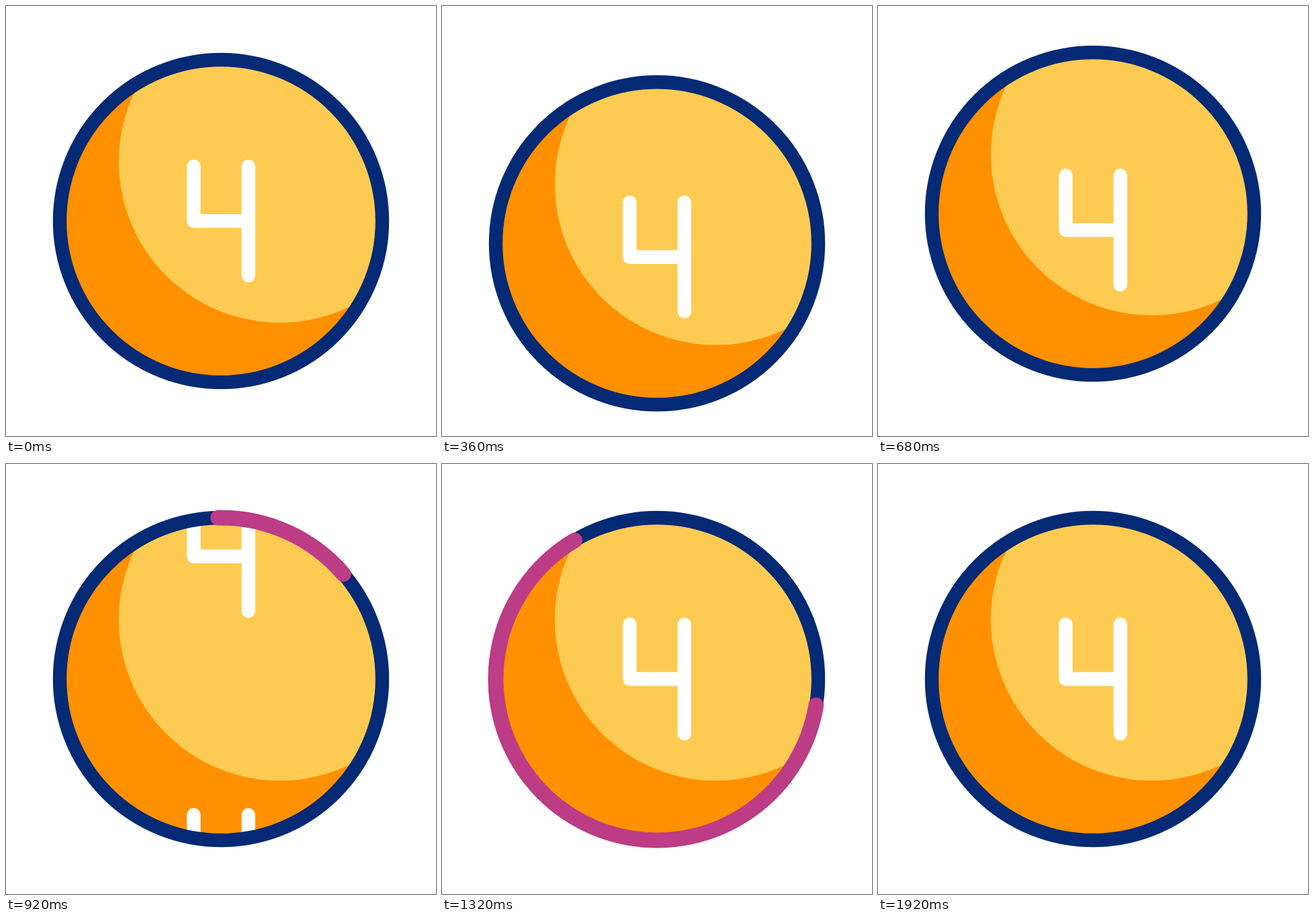
An HTML page with a canvas for the animation above (2 s loop, 640 by 640 pixels).

```html
<!DOCTYPE html>
<html lang="en">
<head>
<meta charset="utf-8">
<title>Bouncing ball</title>
<style>
  html, body { margin: 0; width: 100%; height: 100%; overflow: hidden; background: #fff; }
  canvas { display: block; width: 640px; height: 640px; }
</style>
</head>
<body>
<canvas id="stage" width="640" height="640"></canvas>
<script>
const ctx = document.getElementById('stage').getContext('2d');
const LOOP = 2000, STEP = 40, TAU = Math.PI * 2;
const C = 320, R = 240, LINE = 20.4;
const WRAP = 466; // distance between the two copies of the digit

// Keyframes: [time in ms, value]
const ballY = [[120, 0], [360, 33.3], [560, -30.9], [760, 0]];
const digitY = [[120, 0], [360, 53.7], [560, -61], [760, 54], [1120, -513], [1320, -WRAP]];
const arcHead = [[760, 0], [1440, 1]];
const arcTail = [[1000, 0], [1920, 1]];

// Eased value of a track at time t
function at(track, t) {
  if (t <= track[0][0]) return track[0][1];
  for (let i = 1; i < track.length; i++) {
    const [t0, a] = track[i - 1], [t1, b] = track[i];
    if (t < t1) {
      const s = (t - t0) / (t1 - t0);
      return a + (b - a) * s * s * (3 - 2 * s);
    }
  }
  return track[track.length - 1][1];
}

function disc(x, y, r, color) {
  ctx.fillStyle = color;
  ctx.beginPath();
  ctx.arc(x, y, r, 0, TAU);
  ctx.fill();
}

function stroke(color, width) {
  ctx.strokeStyle = color;
  ctx.lineWidth = width;
  ctx.stroke();
}

function digit(dy) {
  ctx.beginPath();
  ctx.moveTo(279.4, 238.6 + dy);
  ctx.lineTo(279.4, 320 + dy);
  ctx.lineTo(360.8, 320 + dy);
  ctx.moveTo(360.8, 238.6 + dy);
  ctx.lineTo(360.8, 401.2 + dy);
  stroke('#fff', LINE);
}

function draw(t) {
  const y = at(ballY, t), dy = at(digitY, t);
  ctx.fillStyle = '#fff';
  ctx.fillRect(0, 0, 640, 640);
  ctx.lineCap = ctx.lineJoin = 'round';

  ctx.save();
  ctx.beginPath();
  ctx.arc(C, C + y, R, 0, TAU);
  ctx.clip();
  disc(C, C + y, R + 2, '#ff9000');
  disc(407.6, 231.6 + y, 239.7, '#fdcb52');
  digit(dy);
  digit(dy + WRAP);
  ctx.restore();

  ctx.beginPath();
  ctx.arc(C, C + y, R, 0, TAU);
  stroke('#042a75', LINE);

  const head = at(arcHead, t), tail = at(arcTail, t);
  if (head > tail) {
    const top = -TAU / 4 - 0.018;
    ctx.beginPath();
    ctx.arc(C, C + y, R, top + tail * TAU, top + head * TAU);
    stroke('#bc3c85', 23);
  }
}

function tick() {
  const t = performance.now() % LOOP;
  draw(Math.floor(t / STEP) * STEP);
  requestAnimationFrame(tick);
}
tick();
</script>
</body>
</html>
```
